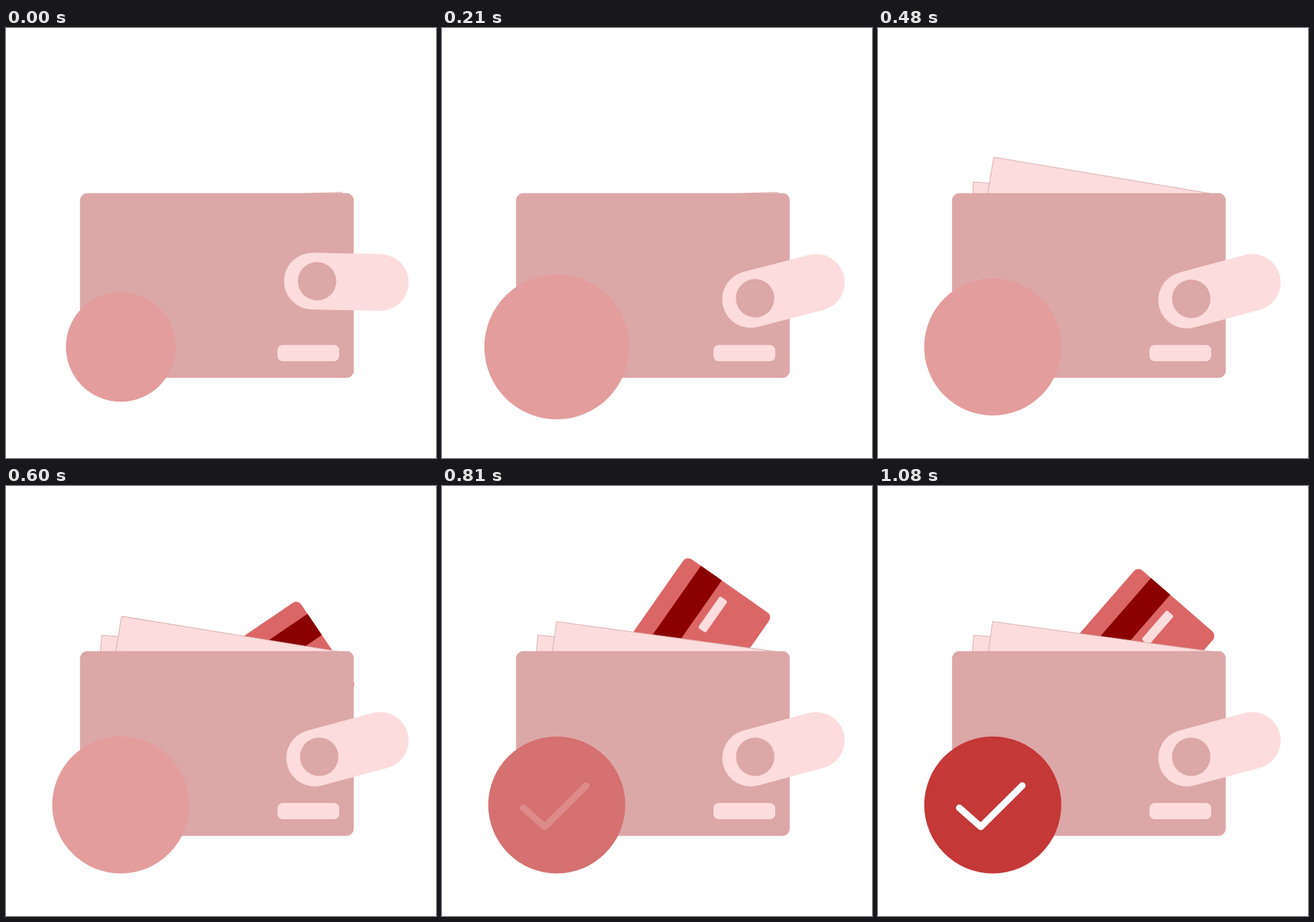
Animation, 640 px wide and 640 px high, one loop 2.04 s. Source, as an HTML page with a canvas:

```html
<!DOCTYPE html>
<html lang="en">
<head>
<meta charset="utf-8">
<title>Wallet payment</title>
<style>
html, body { margin: 0; width: 100%; height: 100%; overflow: hidden; background: #fff; }
canvas { display: block; width: 640px; height: 640px; }
</style>
</head>
<body>
<canvas id="stage" width="640" height="640"></canvas>
<script>
const ctx = document.getElementById('stage').getContext('2d');
const LOOP = 2040, STEP = 30;
const ROSE = '#dca7a7', PALE = '#fcdcdc', CARD = '#db6666', STRIPE = '#8b0000';

const ramp = (t, a, b) => Math.min(1, Math.max(0, (t - a) / (b - a)));
const easeOut = x => Math.sin(x * Math.PI / 2);
const lerp = (a, b, k) => a + (b - a) * k;
const tween = (t, a, b, from, to) => lerp(from, to, easeOut(ramp(t, a, b)));

// Runs to a peak, then settles back
function swing(t, start, top, end, from, peak, rest) {
  return t < top ? tween(t, start, top, from, peak) : tween(t, top, end, peak, rest);
}

function box(x, y, w, h, r, fill) {
  ctx.beginPath();
  ctx.roundRect(x, y, w, h, r);
  ctx.fillStyle = fill;
  ctx.fill();
}

function disc(x, y, r, fill) {
  ctx.beginPath();
  ctx.arc(x, y, r, 0, Math.PI * 2);
  ctx.fillStyle = fill;
  ctx.fill();
}

function turned(x, y, deg, paint) {
  ctx.save();
  ctx.translate(x, y);
  ctx.rotate(deg * Math.PI / 180);
  paint();
  ctx.restore();
}

function bill(deg, x, y, w) {
  turned(485, 255.5, deg, () => {
    box(x, y, w, 150, 0, PALE);
    ctx.strokeStyle = '#d9adad';
    ctx.lineWidth = 1;
    ctx.stroke();
  });
}

function card(deg) {
  turned(222.5, 327, deg, () => {
    ctx.translate(-12, -264);
    box(0, 0, 156, 247, 9, CARD);
    box(26, 0, 38, 247, 0, STRIPE);
    box(75, 20.5, 14, 57.5, 3, PALE);
  });
}

function strap(deg) {
  turned(557, 378.7, deg, () => {
    box(-143.3, -42.3, 185.6, 84.6, 42.3, PALE);
    disc(-94, 0, 28.6, ROSE);
  });
}

function badge(t) {
  const k = ramp(t, 600, 1080);
  const mix = [[227, 196], [157, 56], [156, 55]].map(([a, b]) => Math.round(lerp(a, b, k)));
  const r = 102 * swing(t, 0, 250, 500, 0.8, 1.065, 1);
  disc(170.8, 474.7, r, `rgb(${mix})`);

  ctx.globalAlpha = ramp(t, 750, 1080);
  ctx.beginPath();
  ctx.moveTo(121, 479);
  ctx.lineTo(153, 507.3);
  ctx.lineTo(214.7, 446);
  ctx.strokeStyle = '#fff';
  ctx.lineWidth = 10;
  ctx.lineCap = ctx.lineJoin = 'round';
  ctx.stroke();
  ctx.globalAlpha = 1;
}

function draw(t) {
  ctx.fillStyle = '#fff';
  ctx.fillRect(0, 0, 640, 640);
  card(swing(t, 410, 865, 1000, 90, 34, 41));
  bill(tween(t, 350, 560, -2, 5), -344, -3.5, 356);
  bill(swing(t, 350, 535, 715, -1.9, 10.9, 7.8), -318.9, -10.6, 334);
  box(110.2, 245.7, 407.4, 275, 11, ROSE);
  box(404, 471.7, 92, 24.3, 8, PALE);
  strap(tween(t, 0, 250, 1.1, -15));
  badge(t);
}

const begin = performance.now();
function tick() {
  const t = (performance.now() - begin) % LOOP;
  draw(Math.floor(t / STEP) * STEP);
  requestAnimationFrame(tick);
}
tick();
</script>
</body>
</html>
```
